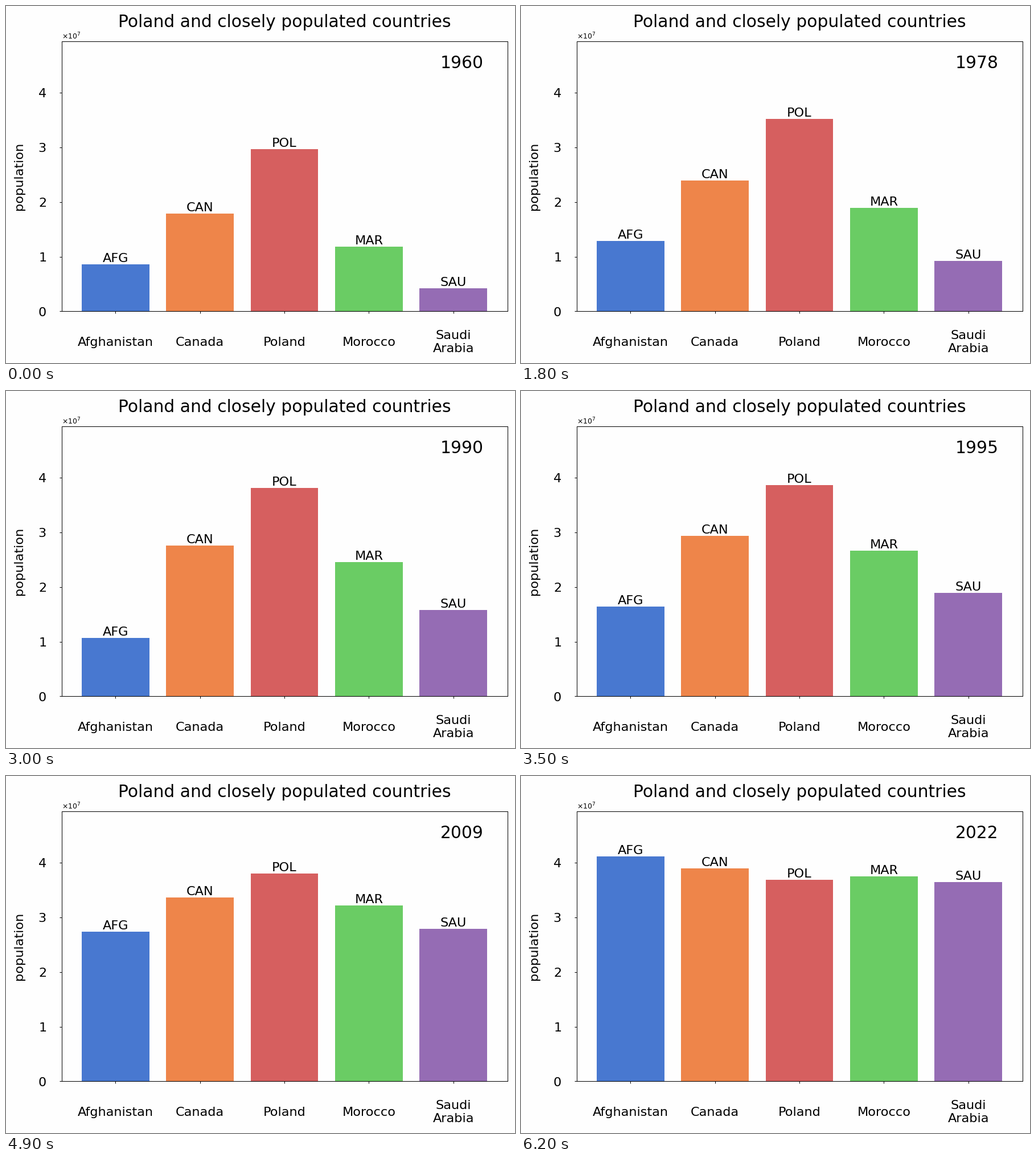
Write a matplotlib script that moves like this. It is 894x626 px and loops after 6300 ms.

```python
import numpy as np
import matplotlib.pyplot as plt
from matplotlib.animation import FuncAnimation

W, H = 894, 626
LEFT, RIGHT, TOP, BOTTOM = 97.5, 880.6, 62.0, 535.5
MARGIN = 13.4
FIRST, LAST = 1960, 2022
PAPER = "#fefefe"

plt.rcParams.update({"font.family": "DejaVu Sans", "mathtext.fontset": "dejavusans"})

# name, code, colour, turning points as {year: millions of people}
COUNTRIES = [
    ("Afghanistan", "AFG", "#4878d0", {
        1960: 8.62, 1972: 11.29, 1979: 12.99, 1982: 10.09, 1985: 10.51, 1991: 10.75,
        1993: 14.0, 1995: 16.42, 1999: 19.26, 2001: 19.69, 2003: 22.65, 2008: 26.43,
        2022: 41.13}),
    ("Canada", "CAN", "#ee854a", {
        1960: 17.91, 1971: 21.96, 1985: 25.84, 1995: 29.3, 2003: 31.64, 2014: 35.44,
        2022: 38.93}),
    ("Poland", "POL", "#d65f5f", {
        1960: 29.64, 1971: 32.78, 1984: 36.9, 1995: 38.59, 1999: 38.66, 2000: 38.26,
        2021: 37.75, 2022: 36.82}),
    ("Morocco", "MAR", "#6acc64", {
        1960: 11.8, 1971: 15.72, 1984: 21.86, 1995: 26.6, 2003: 29.7, 2022: 37.46}),
    ("Saudi\nArabia", "SAU", "#956cb4", {
        1960: 4.17, 1971: 6.37, 1984: 12.28, 1995: 18.89, 2003: 23.14, 2014: 32.13,
        2019: 35.83, 2022: 36.41}),
]


def smooth_curve(points, x):
    """Monotone cubic through the points, flat at each peak and dip."""
    px, py = np.array(list(points.items())).T
    rise = np.diff(py) / np.diff(px)
    a, b = rise[:-1], rise[1:]
    inner = np.where(a * b > 0, 2 * a * b / (a + b), 0)
    slope = np.concatenate([rise[:1], inner, rise[-1:]])

    i = np.clip(np.searchsorted(px, x, side="right") - 1, 0, len(px) - 2)
    span = px[i + 1] - px[i]
    t = (x - px[i]) / span
    ease = t * t * (3 - 2 * t)
    bend = t * (1 - t) * ((1 - t) * slope[i] - t * slope[i + 1])
    return py[i] + (py[i + 1] - py[i]) * ease + span * bend


years = np.arange(FIRST, LAST + 1)
names, codes, colors, points = zip(*COUNTRIES)
heights = 1e6 * np.array([smooth_curve(p, years) for p in points])
slots = range(len(names))

fig = plt.figure(figsize=(10, 7.0023), dpi=89.4, facecolor=PAPER)
ax = fig.add_axes([LEFT / W, 1 - BOTTOM / H, (RIGHT - LEFT) / W, (BOTTOM - TOP) / H],
                  facecolor=PAPER)

bars = ax.bar(slots, heights[:, 0], color=colors)
tags = [ax.text(i, 0, code, size=18, ha="center", va="bottom")
        for i, code in enumerate(codes)]
year_text = ax.text(0.85, 0.9, "", size=24, transform=ax.transAxes)

ax.set_xlim(-0.64, 4.64)
ax.set_ylim(0, 1.2 * heights.max())
ax.set_xticks(slots, names)
ax.set_yticks(np.arange(5) * 1e7)
ax.ticklabel_format(axis="y", style="sci", scilimits=(0, 0), useMathText=True)
ax.tick_params(axis="x", labelsize=18, pad=40)
ax.tick_params(axis="y", labelsize=18, pad=18)
ax.yaxis.get_offset_text().set_size(10)
for label in ax.get_xticklabels():
    label.set_va("center")
ax.set_title("Poland and closely populated countries", size=24, pad=20)
fig.text(MARGIN / W, 1 - (TOP + BOTTOM) / 2 / H, "population", size=18,
         rotation=90, ha="left", va="center")


def update(step):
    for bar, tag, height in zip(bars, tags, heights[:, step]):
        bar.set_height(height)
        tag.set_y(height)
    year_text.set_text(str(years[step]))
    return [*bars, *tags, year_text]


anim = FuncAnimation(fig, update, frames=len(years), interval=100,
                     repeat=True, repeat_delay=0)
plt.show()
```
